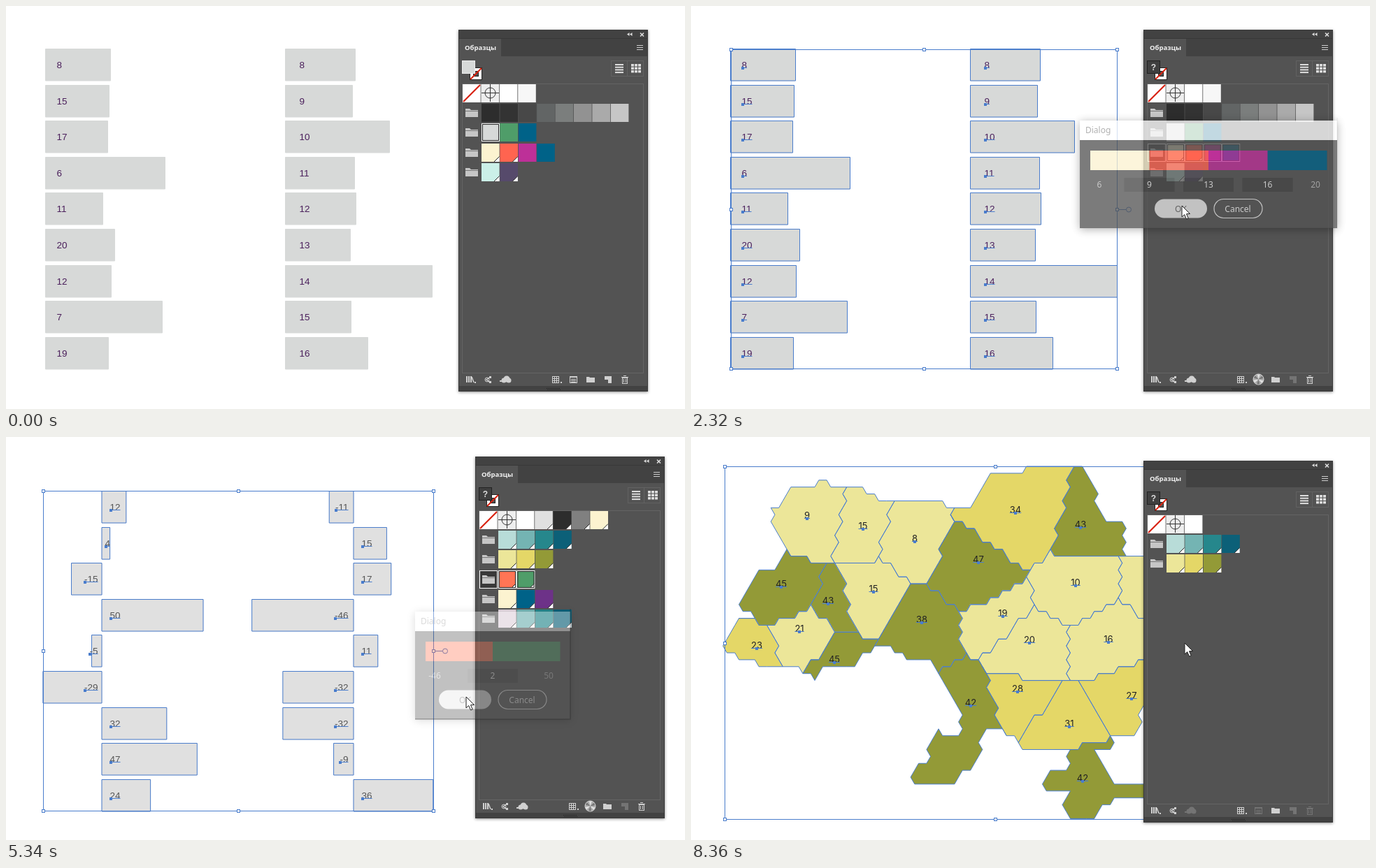
An HTML page with a canvas that plays this animation: 971 px wide and 577 px high, repeating every 8.86 s.

```html
<!DOCTYPE html>
<html lang="ru">
<head>
<meta charset="utf-8">
<title>Swatches by value</title>
<style>
  html, body { margin: 0; width: 100%; height: 100%; overflow: hidden; background: #fff; }
  canvas { display: block; width: 971px; height: 577px; }
</style>
</head>
<body>
<canvas id="stage" width="971" height="577"></canvas>
<script>
const stage = document.getElementById('stage').getContext('2d');
const layer = new OffscreenCanvas(971, 577).getContext('2d');
let ctx = stage;

const LOOP = 8860, STEP = 40, BLUE = '#4a7dcc', BAR_PITCH = 51.6;
const SANS = '"Liberation Sans", Arial, sans-serif';
const UI = '12px "Noto Sans", sans-serif';

const clamp01 = v => Math.max(0, Math.min(1, v));
const progress = (t, [a, b]) => clamp01((t - a) / (b - a));
const ease = p => p < .5 ? 4 * p ** 3 : 1 - (2 - 2 * p) ** 3 / 2;
const mix = (a, b, p) => a + (b - a) * p;

// ---------- bars ----------
function bar(value, left, right, y, x, align = 'left') {
  const path = new Path2D();
  path.rect(left + .5, y + .5, right - left, 45.5);
  return { value, path, x, y: y + 27.5, align };
}

const column = (left, textX, values, widths) => values.map((v, i) =>
  bar(v, left, left + widths[i], Math.round(61 + i * BAR_PITCH), textX));

const signedColumn = (axis, scale, pad, values) => values.map((v, i) => {
  const end = axis + v * scale, x = v < 0 ? axis - pad : axis + (v < 5 ? 5 : 12);
  return bar(v, Math.min(axis, end), Math.max(axis, end), Math.round(77 + i * BAR_PITCH), x, v < 0 ? 'right' : 'left');
});

// ---------- map on a triangular lattice ----------
const TOP = 42, ROW = 9.89, HALF = ROW / Math.sqrt(3);
const rowOf = y => Math.round((y - TOP) / ROW);
const snap = (x, k) => (2 * Math.round((x / HALF - (k & 1)) / 2) + (k & 1)) * HALF;

// Follows an edge with horizontal and 60-degree steps, always top to bottom so neighbours agree.
function latticeEdge([xa, ya], [xb, yb]) {
  const ka = rowOf(ya), kb = rowOf(yb);
  if (ka > kb) return latticeEdge([xb, yb], [xa, ya]).reverse();
  let x = snap(xa, ka);
  const points = [[x, TOP + ka * ROW]];
  for (let k = ka + 1; k <= kb; k++) {
    const next = snap(mix(xa, xb, (k - ka) / (kb - ka)), k), y = TOP + k * ROW;
    points.push([x + Math.sign(next - x) * HALF, y], [next, y]);
    x = next;
  }
  if (ka === kb) points.push([snap(xb, kb), TOP + kb * ROW]);
  return points;
}

function latticePath(corners) {
  const path = new Path2D();
  corners.forEach((c, i) => latticeEdge(c, corners[(i + 1) % corners.length]).forEach(p => path.lineTo(...p)));
  path.closePath();
  return path;
}

// Keeps the part of a convex polygon where side(point) <= 0.
const clipHalf = (corners, side) => corners.flatMap((p, i) => {
  const q = corners[(i + 1) % corners.length], a = side(p), b = side(q);
  const kept = a <= 0 ? [p] : [];
  if (a * b < 0) kept.push([mix(p[0], q[0], a / (a - b)), mix(p[1], q[1], a / (a - b))]);
  return kept;
});

// Each region is the area nearest to its label, less its reach (a power diagram).
const seeds = [
  [9, 166, 112, 63], [15, 246, 127, 52], [8, 320, 145, 59], [34, 464, 104, 86], [43, 557, 125, 63], [47, 411, 175, 69],
  [45, 129, 210, 60], [43, 196, 234, 36], [15, 261, 217, 46], [38, 330, 261, 44], [10, 550, 208, 63], [8, 662, 215, 47],
  [19, 446, 252, 50], [20, 484, 290, 55], [16, 597, 289, 54], [23, 94, 298, 32], [21, 155, 274, 44], [45, 205, 318, 20],
  [28, 467, 360, 35], [42, 400, 380, 32], [31, 541, 410, 32], [27, 630, 370, 53], [42, 560, 488, 45]
];
const power = ([, sx, sy, reach], [x, y]) => (x - sx) ** 2 + (y - sy) ** 2 - reach ** 2;

const regions = seeds.map(seed => {
  let cell = [[0, 0], [720, 0], [720, 577], [0, 577]];
  for (const other of seeds) {
    if (other !== seed) cell = clipHalf(cell, p => power(seed, p) - power(other, p));
  }
  const [value, x, y] = seed;
  return { value, x, y: y + 4.5, align: 'center', path: latticePath(cell) };
});

const coast = latticePath([
  [119, 98], [143, 72], [183, 62], [194, 62], [200, 72], [243, 72], [276, 92], [360, 92], [366, 102], [403, 102],
  [432, 52], [483, 42], [565, 42], [592, 122], [620, 122], [617, 171], [680, 171], [680, 319], [632, 428], [604, 428],
  [600, 447], [575, 447], [605, 495], [660, 490], [660, 517], [605, 515], [570, 546], [545, 546], [535, 522], [543, 507],
  [500, 495], [512, 478], [533, 478], [545, 447], [475, 447], [463, 429], [443, 419], [428, 419], [400, 468], [380, 497],
  [317, 497], [309, 485], [338, 460], [349, 420], [386, 429], [388, 400], [346, 319], [316, 319], [290, 299], [262, 299],
  [225, 329], [190, 329], [176, 349], [158, 329], [104, 329], [49, 295], [66, 260], [88, 260], [72, 236], [95, 191],
  [124, 191], [140, 161], [120, 127]
]);

// ---------- scenes (a trailing * marks a global swatch) ----------
const TEAL = ['#b8dcd8*', '#74b4b3*', '#26878c*', '#0c6078*'];
const OLIVE = ['#ece699*', '#e4d767*', '#939a37*'];

const scenes = [
  {
    start: 0, shift: [0, 0], base: '#d7d9d8', ink: '#4b205c', font: '13.5px ' + SANS, fill: '#d7d9d8',
    shapes: [
      ...column(56, 72.5, [8, 15, 17, 6, 11, 20, 12, 7, 19], [93, 91, 89, 171, 82, 99, 94, 167, 90]),
      ...column(399, 419.5, [8, 9, 10, 11, 12, 13, 14, 15, 16], [100, 96, 149, 99, 101, 93, 210, 94, 118])],
    box: [57, 62, 609, 519], spin: true,
    top: ['#fff', '#f7f7f7'],
    rows: [['#2d2d2d', '#333', '#484848', '#626565', '#7b7e7d', '#929292', '#aaa', '#c6c6c6'],
      ['#d7d9d8', '#4f9d69', '#006288'], ['#fcf3d0*', '#ff6450*', '#bd3098', '#006288'], ['#cbf0e8*', '#564a6b*']],
    picked: 2, single: true, range: [6, 20],
    drag: [40, 920], dragFrom: [23, 27], dragTo: [617, 536], select: 1040, pick: 1440,
    dialog: [556, 164], fade: [[1600, 0], [1760, 1], [2200, 1], [2320, .76], [2520, .76], [2600, 0]],
    move: [1960, 2180], colour: [2480, 2600]
  },
  {
    start: 3100, shift: [24, -6], base: '#e0e0e0', ink: '#555', font: '13.5px ' + SANS, fill: '#2d2d2d',
    shapes: [...signedColumn(136.5, 2.9, 5, [12, 4, -15, 50, -5, -29, 32, 47, 24]),
      ...signedColumn(496.5, 3.16, 7, [-11, 15, 17, -46, 11, -32, -32, -9, 36])],
    box: [53, 77, 611, 535], spin: true,
    top: ['#fff', '#e0e0e0*', '#2d2d2d*', '#808080*', '#fcf3d0*'],
    rows: [TEAL, OLIVE, ['#ff7555*', '#4f9d69*'], ['#fcf3d0*', '#006288*', '#6d3288*'], ['#e0d4dd*', ...TEAL.slice(1)]],
    picked: 2, range: [-46, 50],
    drag: [3260, 4060], dragFrom: [20, 35], dragTo: [622, 560], select: 4140, pick: 4380,
    dialog: [585, 250], fade: [[4380, 0], [4560, 1], [5140, 1], [5420, 0]],
    move: [4600, 4980], colour: [5580, 5740]
  },
  {
    start: 6240, shift: [0, 0], base: '#f2f2f2', ink: '#222', font: '13px Inter, sans-serif', fill: '#2d2d2d',
    shapes: regions, outline: coast, box: [48, 42, 822, 547], top: ['#fff'], rows: [TEAL, OLIVE],
    picked: 1, range: [8, 47],
    drag: [6400, 7320], dragFrom: [39, 11], dragTo: [640, 562], select: 7400, pick: 7640,
    dialog: [596, 173], fade: [[7600, 0], [7640, .005], [7800, 1], [8080, 1], [8220, 0]],
    move: [7840, 8040], colour: [8220, 8360]
  }
];

for (const s of scenes) {
  const [lo, hi] = s.range;
  s.palette = s.rows[s.picked].map(c => c.replace('*', ''));
  const n = s.palette.length;
  s.bounds = Array.from({ length: n + 1 }, (_, i) => lo + (hi - lo) * i / n);
  s.shapes.forEach(o => o.colour = s.palette[s.bounds.slice(1).findIndex(b => o.value <= b)]);
}

// ---------- drawing helpers ----------
function rect(x, y, w, h, colour) { ctx.fillStyle = colour; ctx.fillRect(x, y, w, h); }
function frame(x, y, w, h, colour) {
  ctx.strokeStyle = colour; ctx.lineWidth = 1; ctx.strokeRect(x + .5, y + .5, w - 1, h - 1);
}
function trace(p) {
  ctx.beginPath();
  for (let i = 0; i < p.length; i += 2) ctx.lineTo(p[i], p[i + 1]);
}
function line(colour, width, ...p) {
  ctx.strokeStyle = colour; ctx.lineWidth = width;
  trace(p); ctx.stroke();
}
function poly(colour, ...p) {
  ctx.fillStyle = colour;
  trace(p); ctx.closePath(); ctx.fill();
}
function circle(x, y, r, fill, stroke) {
  ctx.beginPath(); ctx.arc(x, y, r, 0, 7);
  if (fill) { ctx.fillStyle = fill; ctx.fill(); }
  if (stroke) { ctx.strokeStyle = stroke; ctx.lineWidth = 1; ctx.stroke(); }
}
function text(str, x, y, font, colour, align = 'left') {
  ctx.font = font; ctx.fillStyle = colour; ctx.textAlign = align;
  ctx.fillText(str, x, y);
}

// ---------- artwork ----------
function drawArtwork(s, selected, tint) {
  const stroke = (path, colour) => { ctx.strokeStyle = colour; ctx.lineWidth = 1; ctx.stroke(path); };
  const paint = (o, colour, alpha) => {
    ctx.globalAlpha = alpha;
    ctx.fillStyle = colour; ctx.fill(o.path);
    stroke(o.path, colour);
    ctx.globalAlpha = 1;
  };
  ctx.save();
  if (s.outline) ctx.clip(s.outline);
  for (const o of s.shapes) {
    paint(o, s.base, 1);
    if (tint) paint(o, o.colour, tint);
  }
  if (selected) s.shapes.forEach(o => stroke(o.path, BLUE));
  ctx.restore();
  if (selected && s.outline) stroke(s.outline, BLUE);

  for (const o of s.shapes) {
    text(o.value, o.x, o.y, s.font, s.ink, o.align);
    if (!selected) continue;
    const w = ctx.measureText(o.value).width, centred = o.align === 'center';
    const left = o.x - (centred ? w / 2 : o.align === 'right' ? w : 0);
    rect(left, Math.round(o.y - .5), w, 1, BLUE);
    rect(Math.round(centred ? o.x - 2 : left - 1), Math.round(o.y - 2), 4, 4, BLUE);
  }
  if (selected) drawBox(...s.box, s.spin);
}

function drawBox(x0, y0, x1, y1, spin) {
  const xm = Math.round((x0 + x1) / 2), ym = Math.round((y0 + y1) / 2);
  frame(x0, y0, x1 - x0 + 1, y1 - y0 + 1, BLUE);
  if (spin) {
    line(BLUE, 1, x1, ym + .5, x1 + 14, ym + .5);
    circle(x1 + 17, ym + .5, 3.5, '#fff', BLUE);
  }
  for (const x of [x0, xm, x1]) for (const y of [y0, ym, y1]) {
    if (x === xm && y === ym) continue;
    rect(x - 2, y - 2, 5, 5, '#fff');
    frame(x - 2, y - 2, 5, 5, BLUE);
  }
}

// ---------- swatch panel ----------
function swatch(x, y, colour, chosen) {
  rect(x, y, 25.6, 26, colour.replace('*', ''));
  if (colour.endsWith('*')) {
    poly('#fff', x + 25.5, y + 18.5, x + 25.5, y + 26, x + 18, y + 26);
    line('#222', 1, x + 25.5, y + 18.5, x + 18, y + 26);
  }
  if (chosen) { frame(x, y, 26, 26, '#fff'); frame(x + 1, y + 1, 24, 24, '#222'); }
}

function folder(x, y, colour) {
  poly(colour, x - 9, y - 6, x - 3, y - 6, x - 1, y - 4, x + 9, y - 4, x + 9, y + 6, x - 9, y + 6);
  line('#777', 1, x - 9, y - 2.5, x + 9, y - 2.5);
}

function drawIcons(dim, wheel) {
  const c = '#d0d0d0', y = 535;
  const tone = name => dim.includes(name) ? '#747474' : c;
  for (const x of [658, 661, 664]) rect(x, y - 5, 2, 9, c);
  line(c, 1.5, 666, y - 4, 669, y + 4);
  rect(670, y + 3, 2, 2, c);
  circle(688, y, 3, null, c);
  line(c, 1.5, 693, y - 4, 687, y, 692, y + 4);
  rect(691, y - 5, 3, 3, c); rect(691, y + 2, 3, 3, c);
  const cloud = tone('cloud');
  circle(712, y + 1, 3.5, cloud); circle(716, y - 1, 4.5, cloud); circle(719, y + 1, 3.5, cloud);
  rect(706, y + 1, 9, 2, cloud);
  rect(781, y - 5, 10, 10, c);
  for (const i of [0, 3, 6]) for (const j of [0, 3, 6]) rect(782 + i, y - 4 + j, 2, 2, '#555');
  rect(793, y + 3, 2, 2, c);
  if (wheel) {
    circle(811.5, y - .5, 7.5, '#aaa', '#ddd');
    for (let a = 0; a < 6; a++) {
      const angle = a * Math.PI / 3 + .3;
      ctx.beginPath(); ctx.moveTo(811.5, y - .5);
      ctx.arc(811.5, y - .5, 7, angle, angle + .55);
      ctx.fillStyle = a % 2 ? '#777' : '#e2e2e2'; ctx.fill();
    }
  } else {
    const list = tone('list');
    frame(806, y - 5, 11, 10, list); rect(806, y - 5, 11, 2, list);
    for (const j of [-1, 1, 3]) rect(808, y + j, 7, 1, list);
  }
  poly(c, 830, y - 4, 834, y - 4, 835, y - 3, 842, y - 3, 842, y + 4, 830, y + 4);
  poly(tone('page'), 856, y - 5, 866, y - 5, 866, y + 5, 861, y + 5, 861, y, 856, y);
  const bin = tone('bin');
  frame(881, y - 3, 8, 9, bin); rect(880, y - 4, 10, 1, bin); rect(883, y - 6, 4, 1, bin);
  rect(883, y - 1, 1, 5, bin); rect(886, y - 1, 1, 5, bin);
}

function drawPanel(s, selected, picked, coloured) {
  ctx.save();
  ctx.translate(...s.shift);
  ctx.shadowColor = 'rgba(0,0,0,.45)'; ctx.shadowBlur = 4; ctx.shadowOffsetY = 1;
  rect(647, 34, 271, 518, '#535353');
  ctx.shadowColor = 'transparent';
  rect(647, 34, 271, 38, '#424242');
  rect(647, 46, 271, 1, '#383838');
  rect(648, 47, 60, 25, '#535353');
  rect(647, 544, 271, 8, '#424242');
  frame(647, 34, 271, 518, '#393939');
  for (let x = 773; x < 792; x += 2) { rect(x, 547, 1, 1, '#222'); rect(x + 1, 549, 1, 1, '#222'); }
  for (const x of [888, 892]) poly('#ddd', x, 40.5, x + 3.5, 38, x + 3.5, 43);
  line('#ddd', 1.6, 907, 38.5, 912, 43.5); line('#ddd', 1.6, 912, 38.5, 907, 43.5);
  text('Образцы', 656, 63, 'bold 9.5px "Noto Sans", sans-serif', '#f2f2f2');
  for (const y of [56, 59, 62]) rect(902, y, 9, 1, '#ccc');

  // stroke box, then fill box
  rect(663, 88, 18, 18, '#fff'); frame(663, 88, 18, 18, '#222');
  rect(668, 93, 8, 8, '#535353'); frame(668, 93, 8, 8, '#222');
  line('#d8200d', 2, 664, 105, 680, 89);
  rect(652, 78, 19, 19, selected ? '#3f3f3f' : s.fill);
  frame(652, 78, 19, 19, selected ? '#222' : '#eee');
  if (selected) text('?', 661.5, 92, 'bold 12px ' + SANS, '#ddd', 'center');

  frame(865, 78, 24, 23, '#626262'); frame(888, 78, 24, 23, '#626262');
  for (const i of [0, 1, 2, 3]) rect(871, 83 + i * 3.7, 12, 2, '#ddd');
  for (const i of [0, 1, 2]) for (const j of [0, 1, 2]) rect(894 + i * 5, 83 + j * 4.5, 4, 3.5, '#ddd');
  frame(652, 111, 260, 415, '#646464');

  const column = i => 653 + i * 26.4;
  swatch(column(0), 112, '#fff');
  line('#d8200d', 2.2, 654, 137, 678, 113);
  swatch(column(1), 112, '#eee');
  circle(692.5, 124.5, 7.5, null, '#333');
  line('#333', 1, 680, 124.5, 705, 124.5); line('#333', 1, 692.5, 112, 692.5, 137);
  s.top.forEach((c, i) => swatch(column(i + 2), 112, c));
  s.rows.forEach((row, r) => {
    const y = Math.floor(140.3 + r * 28.4), chosen = picked && r === s.picked;
    if (chosen) { rect(653, y, 26, 26, '#3a3a3a'); frame(653, y, 26, 26, '#fff'); }
    folder(666, y + 13, '#c6c6c6');
    row.forEach((c, i) => swatch(column(i + 1) + .6, y, c, chosen || (s.single && !selected && r === 1 && !i)));
  });

  const idle = !picked && (selected || !s.single);
  const dim = idle ? ['cloud', 'list', 'bin'] : [];
  if (picked || coloured) dim.push('page');
  drawIcons(dim, picked);
  ctx.restore();
}

// ---------- dialog ----------
function drawDialog(s, opacity) {
  const n = s.palette.length, [x, y] = s.dialog, w = 76 + 73 * n, mid = x + w / 2;
  layer.clearRect(0, 0, 971, 577);
  ctx = layer;
  ctx.shadowColor = 'rgba(0,0,0,.4)'; ctx.shadowBlur = 12; ctx.shadowOffsetY = 2;
  rect(x, y, w, 154, '#535353');
  ctx.shadowColor = 'transparent';
  rect(x, y, w, 28, '#fff');
  text('Dialog', x + 8, y + 18, UI, '#999');
  const band = (w - 30) / n;
  s.palette.forEach((c, i) => rect(x + 15 + i * band, y + 43, band + .5, 28, c));
  s.bounds.forEach((b, i) => {
    const edge = i === 0 ? 13 : i === n ? -16 : 0, cx = x + 15 + i * band + edge;
    if (!edge) rect(cx - 36, y + 82, 72, 20, '#454545');
    text(Math.floor(b), cx, y + 96, UI, edge ? '#bbb' : '#f0f0f0', 'center');
  });
  ctx.beginPath(); ctx.roundRect(mid - 77, y + 112.5, 75, 27, 13.5);
  ctx.fillStyle = '#e6e6e6'; ctx.fill();
  text('OK', mid - 39.5, y + 130.5, UI, '#666', 'center');
  ctx.beginPath(); ctx.roundRect(mid + 8, y + 112.5, 69, 27, 13.5);
  ctx.strokeStyle = '#e6e6e6'; ctx.lineWidth = 1.2; ctx.stroke();
  text('Cancel', mid + 42, y + 130.5, UI, '#f0f0f0', 'center');

  ctx = stage;
  ctx.globalAlpha = opacity;
  ctx.drawImage(layer.canvas, 0, 0);
  ctx.globalAlpha = .8 * (1 - opacity) ** 2;
  line('#222', 1.5, x + w, y - 4, x + w, y + 154, x, y + 154);
  ctx.globalAlpha = 1;
}

// ---------- pointers ----------
function pointer(x, y, points, fill, stroke) {
  ctx.save();
  ctx.translate(x, y);
  poly(fill, ...points);
  ctx.strokeStyle = stroke; ctx.lineWidth = 1; ctx.stroke();
  ctx.restore();
}
const blackArrow = (x, y) => pointer(x, y, [0, 0, 0, 16, 4.5, 11.5, 11, 11], '#222', '#ddd');
const whiteArrow = (x, y) => pointer(x, y, [0, 0, 0, 16, 3.7, 12.6, 6.5, 19, 9.2, 18, 6.5, 11.7, 11.5, 11.5], '#fff', '#222');

function drawMarquee(s, t) {
  const p = ease(progress(t, s.drag));
  const [x0, y0] = s.dragFrom;
  const x = Math.round(mix(x0, s.dragTo[0], p)), y = Math.round(mix(y0, s.dragTo[1], p));
  if (p > 0) {
    ctx.setLineDash([2, 1.5]);
    frame(x0, y0, x - x0, y - y0, '#444');
    ctx.setLineDash([]);
  }
  blackArrow(p > 0 ? x - 2 : x, y);
}

function draw(t) {
  const s = scenes.filter(scene => t >= scene.start).pop();
  const selected = t >= s.select, tint = progress(t, s.colour);
  const picked = t >= s.pick && tint === 0;
  const next = s.fade.findIndex(([time]) => t <= time);
  const [from, to] = [s.fade[next - 1], s.fade[next]];
  const opacity = from ? mix(from[1], to[1], progress(t, [from[0], to[0]])) : 0;

  rect(0, 0, 971, 577, '#fff');
  drawArtwork(s, selected, tint);
  drawPanel(s, selected, picked, tint > 0);
  if (!selected && t >= STEP) drawMarquee(s, t);
  if (opacity > 0) drawDialog(s, opacity);
  if (t >= s.move[0]) {
    const p = ease(progress(t, s.move));
    const x = s.dialog[0] + (76 + 73 * s.palette.length) / 2 - 38, y = s.dialog[1] + 122;
    whiteArrow(Math.round(mix(x + 60, x, p)), Math.round(mix(y + 58, y, p)));
  }
}

const begin = performance.now();
function tick(now) {
  const t = Math.max(0, now - begin) % LOOP;
  draw(Math.floor(t / STEP) * STEP);
  requestAnimationFrame(tick);
}
draw(0);
requestAnimationFrame(tick);
</script>
</body>
</html>
```
